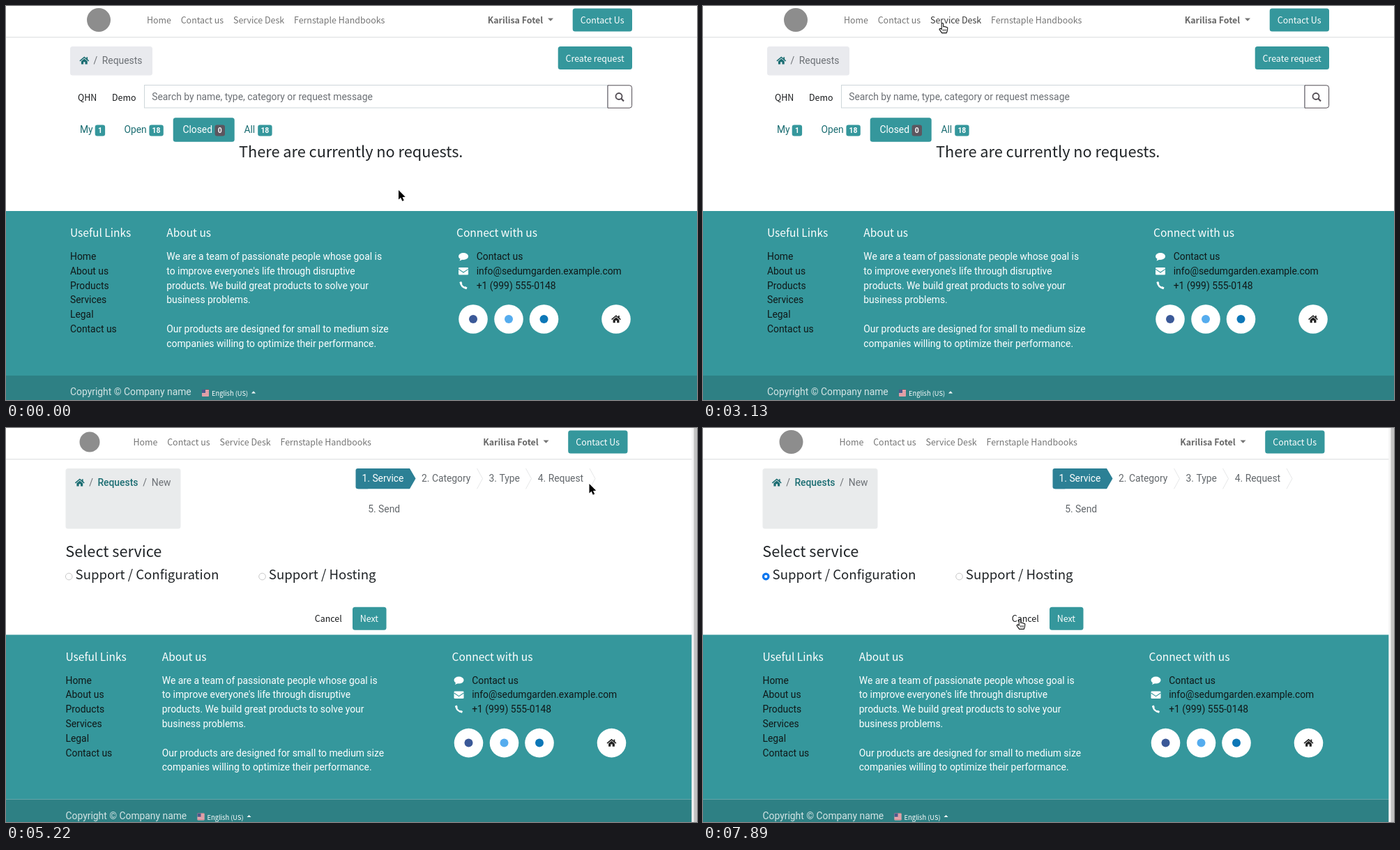
Write an HTML page with a canvas that moves like this. It is 991 by 565 pixels and loops after 8 s.

```html
<!DOCTYPE html>
<html lang="en">
<head>
<meta charset="utf-8">
<title>Requests portal</title>
<style>
  html, body { margin: 0; width: 100%; height: 100%; overflow: hidden; background: #fff; }
  canvas { display: block; width: 991px; height: 565px; }
</style>
</head>
<body>
<canvas id="stage"></canvas>
<script>
const W = 991, H = 565, LOOP = 8000;
const START = 1200, TICK = 148.67;
const TEAL = '#35979c', TEAL_DARK = '#2e8084', LINK = '#1b6d72', INK = '#1f2326', GREY = '#6c7075';
const ROBOTO = 'Roboto, Arial, sans-serif';
const HUMAN = '"Noto Sans CJK JP", "Noto Sans CJK SC", "Noto Sans CJK KR", "Noto Sans CJK", "Open Sans", sans-serif';
const REM = 13.867;

const canvas = document.getElementById('stage');
const dpr = window.devicePixelRatio || 1;
canvas.width = W * dpr;
canvas.height = H * dpr;
const c = canvas.getContext('2d');

function write(str, x, y, color, font) {
  c.font = font;
  c.fillStyle = color;
  c.fillText(str, x, y);
}
const body = (s, x, y, color, size = REM, weight = 400) =>
  write(s, x, y, color, `${weight} ${size}px ${ROBOTO}`);
// The Latin glyphs of this family are drawn 1.117 times larger per em
const title = (s, x, y, color, size = REM, weight = 400) =>
  write(s, x, y, color, `${weight} ${size / 1.117}px ${HUMAN}`);

function box(x, y, w, h, color, r = 0) {
  c.fillStyle = color;
  c.beginPath();
  c.roundRect(x, y, w, h, r);
  c.fill();
}
function disc(x, y, r, color) {
  c.fillStyle = color;
  c.beginPath();
  c.arc(x, y, r, 0, 7);
  c.fill();
}
function trace(pts, close) {
  c.beginPath();
  for (let i = 0; i < pts.length; i += 2) c.lineTo(pts[i], pts[i + 1]);
  if (close) c.closePath();
}
function poly(pts, color) {
  trace(pts, true);
  c.fillStyle = color;
  c.fill();
}
function line(pts, color, width = 1) {
  trace(pts);
  c.strokeStyle = color;
  c.lineWidth = width;
  c.stroke();
}
function at(x, y, draw) {
  c.save();
  c.translate(x, y);
  draw();
  c.restore();
}

function house(x, y, color) {
  at(x, y, () => {
    line([-6.4, .6, 0, -4.8, 6.4, .6], color, 1.6);
    box(3, -5, 1.8, 4, color);
    poly([-4.4, .9, 0, -2.8, 4.4, .9, 4.4, 5.2, 1.2, 5.2, 1.2, 2, -1.2, 2, -1.2, 5.2, -4.4, 5.2], color);
  });
}
function lens(x, y) {
  c.strokeStyle = '#514b52';
  c.lineWidth = 1.8;
  c.beginPath();
  c.arc(x - 1, y - 1, 4.5, 0, 7);
  c.stroke();
  line([x + 2.3, y + 2.3, x + 6, y + 6], '#514b52', 2.2);
}
function bubble(x, y) {
  c.fillStyle = '#fff';
  c.beginPath();
  c.ellipse(x, y - .5, 7, 5, 0, 0, 7);
  c.fill();
  poly([x - 4, y + 2, x - 5.5, y + 6, x, y + 3.5], '#fff');
}
function envelope(x, y) {
  box(x - 7, y - 5, 14, 10.5, '#fff', 1.3);
  line([x - 7, y - 2.6, x, y + 2, x + 7, y - 2.6], TEAL, 1.1);
}
function phone(x, y) {
  c.strokeStyle = '#fff';
  c.lineWidth = 2.4;
  c.beginPath();
  c.moveTo(x - 4, y - 4);
  c.quadraticCurveTo(x - 3, y + 3, x + 4, y + 4);
  c.stroke();
  line([x - 4.3, y - 5, x - 3, y - 1.8], '#fff', 3);
  line([x + 1.6, y + 3, x + 5, y + 4.3], '#fff', 3);
}
function flag(x, y) {
  box(x, y, 10, 10, '#f3e4e6', 1);
  for (let i = 0; i < 5; i++) box(x, y + i * 2.1, 10, 1.1, '#d0606c');
  box(x, y, 5, 5, '#4d5a8c');
}

function button(s, x, y, w, h, textX, base, color = TEAL) {
  box(x, y, w, h, color, 3.5);
  title(s, textX, base, '#fff');
}

const NAV = [['Home', 202], ['Contact us', 250.7], ['Service Desk', 326], ['Fernstaple Handbooks', 413]];

function header(hover, small) {
  box(-10, 44, W + 20, 1.6, '#e6e7e8');
  if (small) disc(126.5, 20, 14.5, '#8d8d8d');
  else disc(133, 20, 17, '#8d8d8d');
  NAV.forEach(([s, x], i) => title(s, x - (small ? 13 : 0), 25, i === hover ? '#3a3a3a' : '#757575'));
  title('Karilisa Fotel', 690.7, 25, '#686868', REM, 700);
  poly([777, 17.5, 785, 17.5, 781, 21.7], '#757575');
  button('Contact Us', 812.7, 3.5, 85.3, 33, 823.8, 25);
}

const LINKS = ['Home', 'About us', 'Products', 'Services', 'Legal', 'Contact us'];
const ABOUT = [
  'We are a team of passionate people whose goal is',
  "to improve everyone's life through disruptive",
  'products. We build great products to solve your',
  'business problems.',
  '',
  'Our products are designed for small to medium size',
  'companies willing to optimize their performance.'
];
const REACH = ['Contact us', 'info@sedumgarden.example.com', '+1 (999) 555-0148'];

function footer() {
  const rows = (list, x, color) => list.forEach((s, i) => body(s, x, 364 + i * REM * 1.5, color));
  box(-10, 294, W + 20, 236, TEAL);
  box(-10, 530, W + 20, 40, TEAL_DARK);
  title('Useful Links', 92, 331, '#fff', 17.33);
  title('About us', 230.3, 331, '#fff', 17.33);
  title('Connect with us', 646, 331, '#fff', 17.33);
  rows(LINKS, 92, '#101818');
  rows(ABOUT, 230.3, '#fff');
  rows(REACH, 674.7, '#101818');
  bubble(656, 359.5);
  envelope(656, 380);
  phone(656, 400.5);
  [[670, '#3b5998'], [721, '#55acee'], [771.5, '#0d77b7']].forEach(([x, color]) => {
    disc(x, 449, 20.8, '#fff');
    disc(x, 449, 6, color);
  });
  disc(875, 449, 20.8, '#fff');
  house(875, 449, '#222');
  body('Copyright © Company name', 92, 558, '#d3e4e5');
  flag(281, 550);
  title('English (US)', 295, 559, '#fff', 10.4);
  poly([352, 555.5, 358, 555.5, 355, 552.3], '#fff');
}

function badge(s, x, w, color) {
  box(x, 170.5, w, 16, color, 3.2);
  body(s, x + 4.2, 182.2, '#fff', 10.4, 700);
}

function listPage(k) {
  const hover = k >= 16 && k <= 19 ? 3 : k >= 12 && k <= 15 ? 2 : k >= 8 && k <= 10 ? 1 : -1;
  header(hover, false);
  box(92, 58, 118, 41.5, '#e9eaee', 3.5);
  house(112.3, 78.3, LINK);
  body('/', 125.5, 83, GREY);
  body('Requests', 137.8, 83, GREY);
  button('Create request', 791.7, 58, 106.3, 33, 802.6, 79.7, k >= 22 ? '#277074' : TEAL);

  title('QHN', 103, 135.5, '#141618');
  title('Demo', 152, 135.5, '#141618');
  c.lineWidth = 1;
  c.strokeStyle = '#ced6da';
  c.strokeRect(198.5, 113.5, 664, 32.5);
  c.strokeStyle = '#514b52';
  c.beginPath();
  c.roundRect(863, 113.8, 34.6, 32.4, [0, 3.5, 3.5, 0]);
  c.stroke();
  body('Search by name, type, category or request message', 209.2, 135, GREY);
  lens(880, 130.5);

  body('My', 106, 182, LINK);
  badge('1', 127.7, 14.4, TEAL);
  body('Open', 169.4, 182, LINK);
  badge('18', 205.4, 20.4, TEAL);
  box(239.7, 160.3, 88, 34.5, TEAL, 3.5);
  body('Closed', 253.4, 182, '#fff');
  badge('0', 299.6, 14.4, '#5c565f');
  body('All', 341.4, 182, LINK);
  badge('18', 361.2, 20.4, TEAL);

  title('There are currently no requests.', 334, 217.4, INK, 24.27);
  footer();
}

function radio(x, y, on) {
  if (on) {
    disc(x, y, 5.4, '#0b76ef');
    disc(x, y, 2.2, '#fff');
    return;
  }
  c.strokeStyle = '#c9c9c9';
  c.lineWidth = 1;
  c.beginPath();
  c.arc(x, y, 4.8, 0, 7);
  c.stroke();
}

function servicePage(k) {
  at(-6.5, 0, () => header(-1, k < 28));
  box(85.5, 58, 165, 86.5, '#e9ebec', 3.5);
  house(105.8, 78.3, LINK);
  body('/', 119.2, 83, GREY);
  body('Requests', 131.4, 83, LINK, REM, 500);
  body('/', 196.2, 83, GREY);
  body('New', 208.8, 83, GREY);

  box(501.5, 58, 20, 29.3, '#2c8095', 3);
  poly([505, 58, 579, 58, 587.5, 72.6, 579, 87.3, 505, 87.3], '#2c8095');
  [675.5, 745.5, 837].forEach(x => line([x, 58, x + 8, 72.6, x, 87.3], '#e6e7e8'));
  body('1. Service', 510.5, 77.3, '#fff');
  body('2. Category', 596, 77.3, '#62676b');
  body('3. Type', 692.5, 77.3, '#62676b');
  body('4. Request', 762.8, 77.3, '#62676b');
  body('5. Send', 519.2, 120.7, '#62676b');

  title('Select service', 85.2, 184.8, INK, 24.27);
  radio(90.2, 213, k >= 39);
  title('Support / Configuration', 99.6, 216.8, INK, 20.8);
  radio(367.5, 213, false);
  title('Support / Hosting', 376.8, 216.8, INK, 20.8);
  title('Cancel', 442.8, 278.2, '#141618');
  button('Next', 497, 256.7, 48.5, 33, 507.7, 278.2);
  at(-6.5, 2.6, footer);
  box(983.3, 0, 8, H, '#f4f4f4');
  box(986.5, 0, 4.5, H, '#c2c2c2');
}

// Pointer stops: tick, x, y
const PATH = [
  [-1, 563, 264], [1, 505, 209], [4, 372, 82], [6, 317, 33], [7, 281, 26],
  [10, 296, 25], [14, 360, 24], [16, 430, 22], [18, 538, 22], [19, 567, 26],
  [22, 829, 88], [25, 836.5, 80], [29, 836.5, 80], [31, 742, 180],
  [33, 577, 270], [35, 335, 254], [37, 104, 213], [38, 95, 211],
  [40, 91, 209], [42, 190, 226], [45, 455, 274]
];

function pointer(k) {
  let i = 0;
  while (i < PATH.length - 2 && PATH[i + 1][0] <= k) i++;
  const [k0, x0, y0] = PATH[i], [k1, x1, y1] = PATH[i + 1];
  const p = Math.min(1, (k - k0) / (k1 - k0));
  return [x0 + (x1 - x0) * p, y0 + (y1 - y0) * p];
}

function arrow() {
  trace([0, 0, 0, 13.6, 3.1, 10.8, 5.3, 15.8, 7.7, 14.7, 5.5, 9.9, 9.7, 9.7], true);
  c.fillStyle = '#000';
  c.strokeStyle = '#fff';
  c.lineWidth = 1.6;
  c.stroke();
  c.fill();
}

function hand() {
  c.beginPath();
  c.moveTo(-1.8, 9);
  c.lineTo(-1.8, 1.2);
  c.quadraticCurveTo(-.5, -.8, .7, 1.2);
  c.lineTo(.7, 5.4);
  c.quadraticCurveTo(2, 4.4, 3, 5.8);
  c.quadraticCurveTo(4.4, 5, 5, 6.4);
  c.quadraticCurveTo(6.6, 5.8, 6.8, 7.6);
  c.lineTo(6.4, 11.4);
  c.lineTo(5.2, 14.4);
  c.lineTo(-1.4, 14.4);
  c.lineTo(-5, 9.4);
  c.quadraticCurveTo(-4.6, 7, -1.8, 9);
  c.closePath();
  c.fillStyle = '#fff';
  c.fill();
  c.strokeStyle = '#111';
  c.lineWidth = 1.1;
  c.stroke();
  for (const x of [.3, 2.3, 4.3]) line([x, 9, x, 12], '#111', .8);
}

function draw(t) {
  const k = t < START ? -1 : Math.floor((t - START + 12) / TICK);
  c.setTransform(dpr, 0, 0, dpr, 0, 0);
  c.fillStyle = '#fff';
  c.fillRect(0, 0, W, H);
  if (k < 27) listPage(k);
  else servicePage(k);
  const [x, y] = pointer(k);
  const overLink = (k >= 7 && k <= 10) || (k >= 12 && k <= 18) || k >= 45;
  at(x, y, overLink ? hand : arrow);
}

function frame() {
  draw(performance.now() % LOOP);
  requestAnimationFrame(frame);
}
frame();
</script>
</body>
</html>
```
